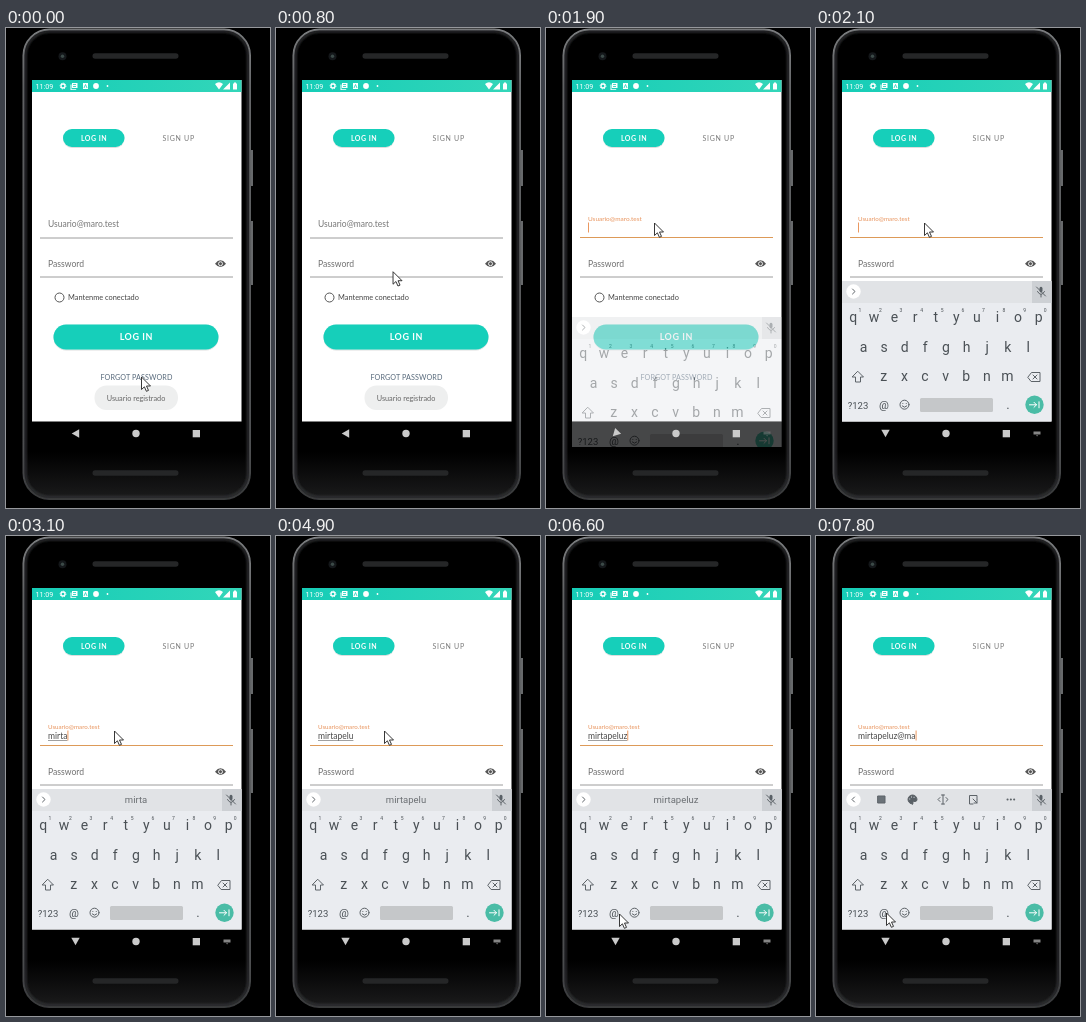
These frames come from a looping animation (264x480 px, 8 s). An HTML page:

```html
<!DOCTYPE html>
<html lang="es">
<head>
<meta charset="utf-8">
<title>Login</title>
<style>
  html, body { margin: 0; width: 100%; height: 100%; overflow: hidden; background: #000; }
  svg { display: block; width: 264px; height: 480px; }
  text { font-family: Lato, sans-serif; white-space: pre; }
  .mid { text-anchor: middle; }
  #keyboard text { font-family: Roboto, sans-serif; fill: #4a5055; }
  #keyboard #suggestion { fill: #6b6f73; }
  .icon { fill: none; stroke: #5d6368; stroke-width: 1; stroke-linecap: round; stroke-linejoin: round; }
</style>
</head>
<body>
<svg viewBox="0 0 264 480">
  <defs>
    <linearGradient id="teal"><stop stop-color="#16cdb7"/><stop offset="1" stop-color="#33d6b9"/></linearGradient>
    <linearGradient id="edge" x2="0" y2="1"><stop stop-color="#8b8d8f"/><stop offset=".12" stop-color="#6a6c6e"/><stop offset=".9" stop-color="#505254"/><stop offset="1" stop-color="#3a3b3c"/></linearGradient>
    <linearGradient id="body" x2="0" y2="1"><stop offset=".9"/><stop offset="1" stop-color="#1b1b1c"/></linearGradient>
    <clipPath id="screen"><path d="M26 52H235.500V419H26z"/></clipPath>
    <filter id="soft"><feGaussianBlur stdDeviation="1"/></filter>
    <filter id="shadow" x="-10%" y="-20%" width="120%" height="160%"><feDropShadow dx="0" dy=".6" stdDeviation=".6" flood-opacity=".22"/></filter>
  </defs>

  <!-- Phone -->
  <path d="M244 122h3v36h-3zM244 193h3v64h-3z" fill="#67696b"/>
  <rect x="17.500" y="1.500" width="226.500" height="469.500" rx="26" fill="url(#body)" stroke="url(#edge)" stroke-width="2"/>
  <rect x="19.500" y="3.500" width="222.500" height="465.500" rx="24" fill="none" stroke="#343637" stroke-width="2" filter="url(#soft)"/>
  <circle cx="56.500" cy="28.300" r="4" fill="#14171a"/><circle cx="56.500" cy="28.300" r="1.700" fill="#3c4a48"/>
  <rect x="86.500" y="25.300" width="86" height="5.500" rx="2.700" fill="#252627"/>
  <rect x="86.500" y="442.300" width="86" height="5.500" rx="2.700" fill="#252627"/>
  <path d="M26 52H235.500V419H26z" fill="#000"/>

  <!-- App -->
  <path d="M26 52H235.500V393.500H26z" fill="#fff"/>
  <path d="M26 52H235.500V64H26z" fill="url(#teal)"/>
  <g fill="#fff">
    <text x="29.500" y="60.500" font-size="7.200" style="font-family:Roboto,sans-serif">11:09</text>
    <circle cx="57" cy="58" r="2" fill="none" stroke="#fff" stroke-width="1.300"/>
    <circle cx="57" cy="58" r="2.900" fill="none" stroke="#fff" stroke-dasharray="1.150 1.130"/>
    <path d="M66 55h5.500v5h-5.500zM64.500 56.500h1v4.700h4.700v.8h-5.700zM77 55h5v6h-5z"/>
    <path d="M67 56.500h3M67 58.500h3M78 60l1.500-3.500 1.500 3.500" fill="none" stroke="#20d0b8" stroke-width=".8"/>
    <circle cx="90" cy="58" r="2.900"/><circle cx="101.500" cy="58" r=".9"/>
    <path d="M209 56q4-3.500 8 0l-4 5.500zM224 54.500v7h-7zM227 55.500h1v-1h2v1h1v6h-4z"/>
  </g>
  <rect x="57" y="101" width="61.500" height="18" rx="9" fill="#14cfba" filter="url(#shadow)"/>
  <text class="mid" x="88" y="112.600" font-size="7" font-weight="700" letter-spacing=".45" fill="#fff">LOG IN</text>
  <text class="mid" x="172.700" y="112.600" font-size="7" letter-spacing=".7" fill="#7a7a7a">SIGN UP</text>
  <path id="emailLine"/>
  <text id="hint" font-size="8.500">Usuario@maro.test</text>
  <text id="email" x="42" y="202.500" font-size="8.500" fill="#4a4a4a"></text>
  <path id="composing" stroke="#777" stroke-width=".7"/>
  <path id="caret" stroke="#e98d4e" stroke-width=".9"/>
  <text x="42" y="238.500" font-size="8.600" fill="#707070">Password</text>
  <path d="M34 249H227" stroke="#858585" stroke-width=".8"/>
  <path d="M209 235.700q5.500-6.800 11 0q-5.500 6.800-11 0z" fill="#555"/>
  <circle cx="214.500" cy="235.700" r="2" fill="#555" stroke="#fff" stroke-width=".9"/>
  <circle cx="53.500" cy="269.500" r="4.500" fill="none" stroke="#555"/>
  <text x="62" y="272" font-size="7.400" fill="#444">Mantenme conectado</text>
  <rect x="47.500" y="296.500" width="165" height="25" rx="12.500" fill="#14cfba" filter="url(#shadow)"/>
  <text class="mid" x="130.300" y="312.300" font-size="9" font-weight="700" letter-spacing=".55" fill="#fff">LOG IN</text>
  <text class="mid" x="130.500" y="351.800" font-size="7.200" letter-spacing=".1" fill="#56687a">FORGOT PASSWORD</text>
  <g id="toast">
    <rect x="88.500" y="357.500" width="83.500" height="24.500" rx="12" fill="#eeefef"/>
    <text class="mid" x="130" y="372.500" font-size="7.300" fill="#666">Usuario registrado</text>
  </g>

  <!-- Keyboard -->
  <g clip-path="url(#screen)"><g id="keyboard">
    <path d="M26 253H236V393.500H26z" fill="#eaecf0"/>
    <path d="M26 253H216v22H26z" fill="#e1e3e6"/>
    <path d="M216 253h20v22h-20z" fill="#cdd0d4"/>
    <circle cx="37.500" cy="263.500" r="7.200" fill="#fff"/>
    <path id="chevron" class="icon"/>
    <text id="suggestion" class="mid" x="130" y="267" font-size="9.500"></text>
    <g id="tools" class="icon">
      <path d="M62 260h7v7h-7z" fill="#6b7278"/>
      <path d="M96.500 268a4.500 4.500 0 1 1 4.500-4.500q0 2-2 2h-1.500q-1 0-.5 1.200t-.5 1.300z" fill="#596066"/>
      <path d="M93.700 263h.1M95.500 261h.1M98 261.300h.1" stroke="#e9ecef"/>
      <path d="M127 259v9M125.500 259h3M125.500 268h3M124 261.500l-2 2 2 2M130 261.500l2 2-2 2"/>
      <path d="M157 268h-3.500v-8.500h7.500v4M157 263l4 4m0-3v3h-3"/>
      <path d="M191.500 263.500h.1M194.800 263.500h.1M198.100 263.500h.1" stroke-width="2"/>
    </g>
    <path d="M223.500 260q1.500-2.500 3 0v3q-1.500 3-3 0z" fill="#596066"/>
    <path d="M221.500 263.500q3.500 6 7 0M225 266.500v2.500M220.500 259l9 9" class="icon"/>
    <g id="keys"></g>
    <path class="icon" d="M42 343.500l5.500 5.500h-3v5h-5v-5h-3zM212 349l3.500-4.500h8.500v9h-8.500zM217 347l4 4m0-4l-4 4"/>
    <text class="mid" x="42" y="380.500" font-size="9.500">?123</text>
    <text class="mid" x="68" y="380.500" font-size="11">@</text>
    <circle class="icon" cx="88.500" cy="376.700" r="4.500"/>
    <path class="icon" d="M86.800 375.500h.1M90.200 375.500h.1M86.200 378q2.300 2.600 4.600 0"/>
    <rect x="104" y="370" width="73" height="14" rx="1.500" fill="#c5c7c9"/>
    <text class="mid" x="192" y="381" font-size="13">.</text>
    <circle cx="218.500" cy="376.800" r="9.200" fill="#4abca6"/>
    <path class="icon" d="M213.500 376.800h7m-2.500-2.500l2.500 2.500-2.500 2.500M223 373.800v6" style="stroke:#fff"/>
  </g></g>

  <!-- Navigation -->
  <path id="scrim" d="M26 393.500H235.500V419H26z"/>
  <g fill="#cacaca">
    <path id="back" d="M65.700 405.500l7.500-4.200v8.400z"/>
    <circle cx="130" cy="405.500" r="3.700"/>
    <path d="M186.700 402h7.300v7.300h-7.300z"/>
    <path id="switcher" d="M217.500 403.500h7v3h-7zM220 407.300h2.200l-1.100 1.100z" fill="#858585"/>
  </g>
  <path id="pointer" d="M0 0V12.500L2.900 9.800 4.900 14.300 7 13.400 5 9H9z" fill="#fff" stroke="#222" stroke-width=".9"/>
</svg>
<script>
const $ = id => document.getElementById(id);
const set = (id, attrs) => { for (const k in attrs) $(id).setAttribute(k, attrs[k]); };
const clamp = v => Math.min(1, Math.max(0, v));
const progress = (t, from, to) => clamp((t - from) / (to - from));
const lerp = (a, b, p) => a + (b - a) * p;
const smooth = p => p * p * (3 - 2 * p);

const LOOP = 8000, FOCUS = 1700, SYMBOL = 7000;
const typed = 'mirtapeluz@ma';
const keyTimes = [2400, 2600, 2800, 3000, 3100, 3300, 3500, 3800, 4000, 5300, SYMBOL, 7600, 7700];
// from, to, x0, y0, x1, y1
const pointerMoves = [
  [300, 1100, 135.5, 349, 108.5, 195],
  [5400, 6100, 108.5, 195, 73.5, 378],
  [6600, 7000, 73.5, 378, 70.5, 377]
];

// letters, first key centre, baseline
const rows = [['qwertyuiop', 37.3, 293.5], ['asdfghjkl', 47.5, 323.5], ['zxcvbnm', 67.8, 353]];
$('keys').innerHTML = rows.map(([letters, x0, y], row) => [...letters].map((c, i) => {
  const x = x0 + i * 20.6;
  const digit = row ? '' : `<text class="mid" x="${x + 6.5}" y="284" font-size="5">${(i + 1) % 10}</text>`;
  return `<text class="mid" x="${x}" y="${y}" font-size="14">${c}</text>${digit}`;
}).join('')).join('');

function pointerAt(t) {
  const [from, to, x0, y0, x1, y1] = pointerMoves.filter(m => t >= m[0]).pop() || pointerMoves[0];
  const p = smooth(progress(t, from, to));
  return [lerp(x0, x1, p), lerp(y0, y1, p)];
}

function draw(t) {
  const focused = t >= FOCUS;
  const open = progress(t, FOCUS, 2100);
  const float = 1 - (1 - progress(t, FOCUS, 2000)) ** 2;
  const count = keyTimes.filter(k => t >= k).length;
  const text = typed.slice(0, count);
  const tools = t >= SYMBOL + 100;

  set('pointer', { transform: `translate(${pointerAt(t)})` });
  set('toast', { opacity: 1 - progress(t, 1200, 1540) });
  set('hint', {
    transform: `translate(42 ${lerp(199, 192.7, float)}) scale(${lerp(1, .73, float)})`,
    fill: focused ? '#e8935c' : '#777'
  });
  set('emailLine', focused
    ? { d: 'M34 209.5H227', stroke: '#dd9a58', 'stroke-width': 1.1 }
    : { d: 'M34 210H227', stroke: '#858585', 'stroke-width': .8 });

  $('email').textContent = text;
  const end = 42 + (text ? $('email').getComputedTextLength() : 0);
  set('composing', { d: `M42 204.5H${end}`, opacity: count && !tools ? 1 : 0 });
  const idle = t - (count ? keyTimes[count - 1] : FOCUS);
  const blinkOn = Math.floor(idle / 500) % 2 === 0;
  set('caret', { d: `M${end + .5} 194.5V204.500`, opacity: focused && blinkOn ? 1 : 0 });

  set('keyboard', { transform: `translate(0 ${72 * (1 - open)})`, opacity: open });
  set('scrim', { opacity: open > 0 && open < 1 ? .4 : 0 });
  set('back', { transform: `rotate(${-90 * open} 69.5 405.5)` });
  set('switcher', { opacity: open });
  set('tools', { opacity: tools ? 1 : 0 });
  set('chevron', { d: tools ? 'M38.5 261l-2.5 2.5 2.5 2.5' : 'M36.5 261l2.5 2.5-2.5 2.5' });
  $('suggestion').textContent = tools ? '' : text.split('@')[0];
}

function tick() {
  draw(Math.floor(performance.now() % LOOP / 100) * 100);
  requestAnimationFrame(tick);
}
tick();
</script>
</body>
</html>
```
